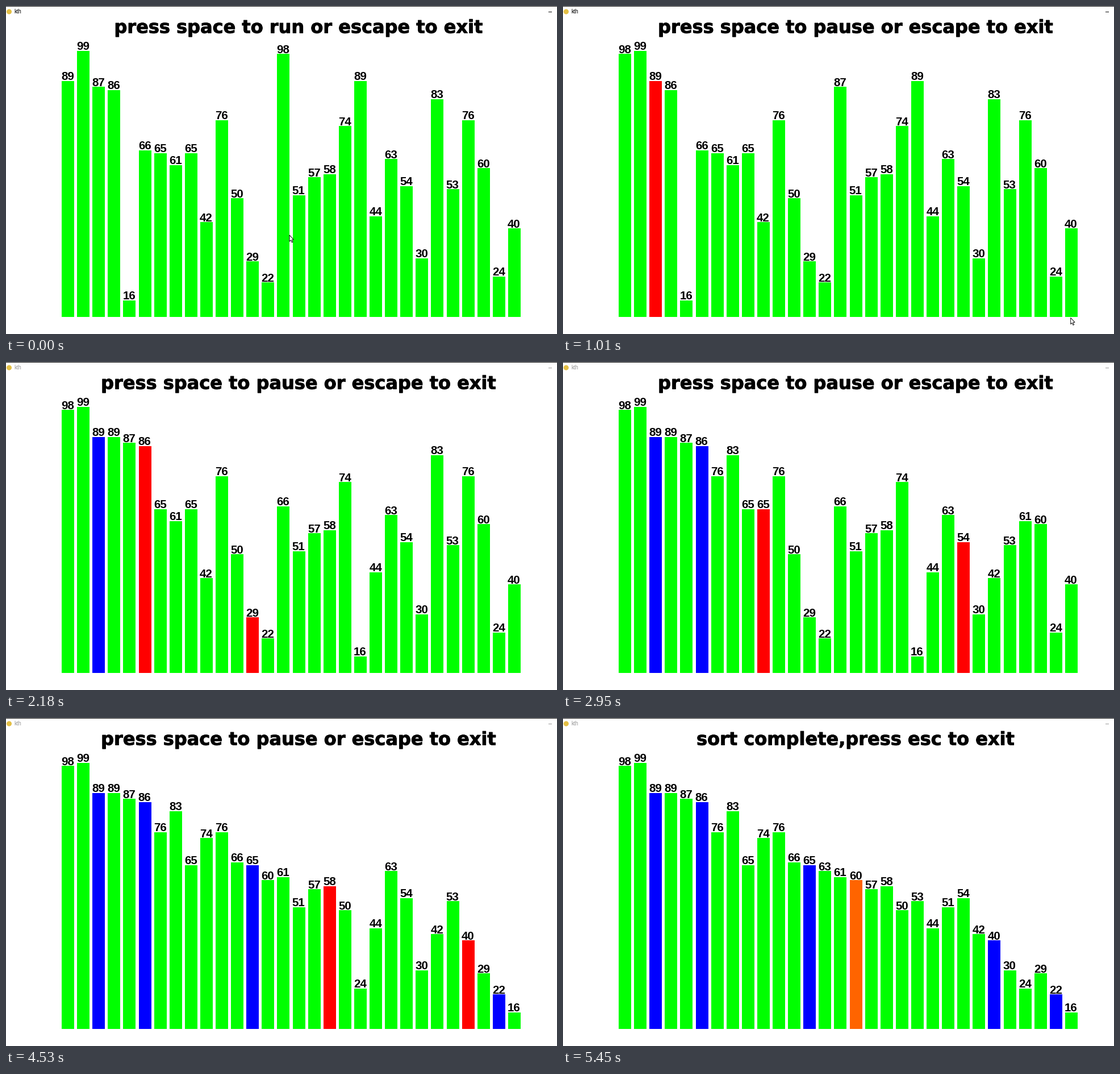
A matplotlib script for the animation above (5.78 s loop, 970 px wide and 577 px high).

```python
import matplotlib.pyplot as plt
import numpy as np
from matplotlib import patheffects
from matplotlib.animation import FuncAnimation
from matplotlib.patches import Circle, Polygon, Rectangle

W, H, DPI = 970, 577, 64  # a power of two keeps the pixel size exact
LOOP, INTERVAL = 5780, 20
TICK = 40.35  # the picture refreshes on this grid, in ms

VALUES = [89, 99, 87, 86, 16, 66, 65, 61, 65, 42, 76, 50, 29, 22, 98,
          51, 57, 58, 74, 89, 44, 63, 54, 30, 83, 53, 76, 60, 24, 40]
KTH = 15
BASE, BAR_W, PITCH, LEFT = 547, 22, 27.1, 98

GREEN, RED, BLUE, ORANGE = "#00ff00", "#ff0000", "#0000ff", "#ff6400"
TITLES = {
    "idle": "press space to run or escape to exit",
    "run": "press space to pause or escape to exit",
    "done": "sort complete,press esc to exit",
}

# (time in ms, step reached); flat stretches are stalls
PACE = [(0, 0), (199, 0), (200, 1), (265, 3), (475, 3.9), (476, 16),
        (1005, 32), (1205, 38), (1480, 38.9), (1481, 39), (2170, 57),
        (2940, 80), (3550, 98), (4390, 125), (4510, 125.9), (4515, 128),
        (5445, 156)]
PACE_T, PACE_STEP = zip(*PACE)

CURSOR = np.array([(0, 0), (0, 11.2), (2.5, 8.9), (4.3, 12.9),
                   (6, 12.1), (4.3, 8.2), (7.4, 8)])
CURSOR_FROM, CURSOR_TO = np.array([499, 403]), np.array([895, 549])
CURSOR_START, CURSOR_TIME, CURSOR_GONE = 480, 530, 1080
FOCUS_LOST = 1290


def quickselect(values, k):
    """Every drawn step of a descending quickselect: values, colours, mode."""
    a = list(values)
    placed = {}
    steps = [(tuple(a), {}, "idle")]

    def record(*marks):
        steps.append((tuple(a), {**placed, **dict.fromkeys(marks, RED)}, "run"))

    lo, hi = 0, len(a) - 1
    while True:
        i, j, pivot = lo, hi, a[lo]
        record(i, j)
        while i < j:
            while i < j and a[j] <= pivot:
                j -= 1
                record(i, j)
            if i < j:
                a[i], a[j] = a[j], a[i]
                record(i, j)
            while i < j and a[i] >= pivot:
                i += 1
                record(i, j)
            if i < j:
                a[i], a[j] = a[j], a[i]
                record(i, j)
        if i == k:
            steps.append((tuple(a), {**placed, i: ORANGE}, "done"))
            return steps
        placed[i] = BLUE
        record()
        lo, hi = (i + 1, hi) if i < k else (lo, i - 1)


STEPS = quickselect(VALUES, KTH)


def bar_top(value):
    return 602.6 - 5.289 * value


def px(size):
    return size * 72 / DPI


fig = plt.figure(figsize=(W / DPI, H / DPI), dpi=DPI, facecolor="white")
ax = fig.add_axes([0, 0, 1, 1])
ax.set_xlim(0, W)
ax.set_ylim(H, 0)
ax.axis("off")

# window frame
ax.add_patch(Rectangle((0, 0), W, 1, color="#1c1c1c", lw=0))
ax.add_patch(Circle((5.5, 10), 4.5, color="#e3bf45", lw=0))
caption = ax.text(14, 13.4, "kth", family="Liberation Sans", size=px(9.5))
minimise = ax.add_patch(Rectangle((955, 10), 6, 1, lw=0))

title = ax.text(514.5, 47.5, "", family="DejaVu Sans", weight="bold",
                size=px(32), ha="center", va="baseline")
title.set_path_effects([patheffects.withStroke(linewidth=px(0.9),
                                               foreground="black")])

bars, labels = [], []
for n in range(len(VALUES)):
    x = LEFT + PITCH * n
    bars.append(ax.add_patch(Rectangle((x, BASE), BAR_W, 0, lw=0)))
    labels.append(ax.text(x + BAR_W / 2 - 0.3, 0, "", family="Liberation Sans",
                          weight="bold", size=px(20.5), ha="center",
                          va="baseline"))

cursor = ax.add_patch(Polygon(CURSOR, closed=True, fc="white", ec="black",
                              lw=px(0.9), zorder=5))


def update(frame):
    t = (frame * INTERVAL + INTERVAL / 2) // TICK * TICK
    values, colours, mode = STEPS[int(np.interp(t, PACE_T, PACE_STEP))]

    title.set_text(TITLES[mode])
    for n, value in enumerate(values):
        top = bar_top(value)
        bars[n].set_y(top)
        bars[n].set_height(BASE - top)
        bars[n].set_facecolor(colours.get(n, GREEN))
        labels[n].set_text(str(value))
        labels[n].set_y(top - 1.5)

    ink = "black" if t < FOCUS_LOST else "#9a9a9a"
    caption.set_color(ink)
    minimise.set_facecolor(ink)

    p = max(0, (t - CURSOR_START) / CURSOR_TIME) ** 1.4
    cursor.set_xy(CURSOR + CURSOR_FROM + p * (CURSOR_TO - CURSOR_FROM))
    cursor.set_visible(t < CURSOR_GONE)


anim = FuncAnimation(fig, update, frames=LOOP // INTERVAL, interval=INTERVAL,
                     init_func=lambda: update(0), repeat=True, repeat_delay=0,
                     blit=False)
plt.show()
```
